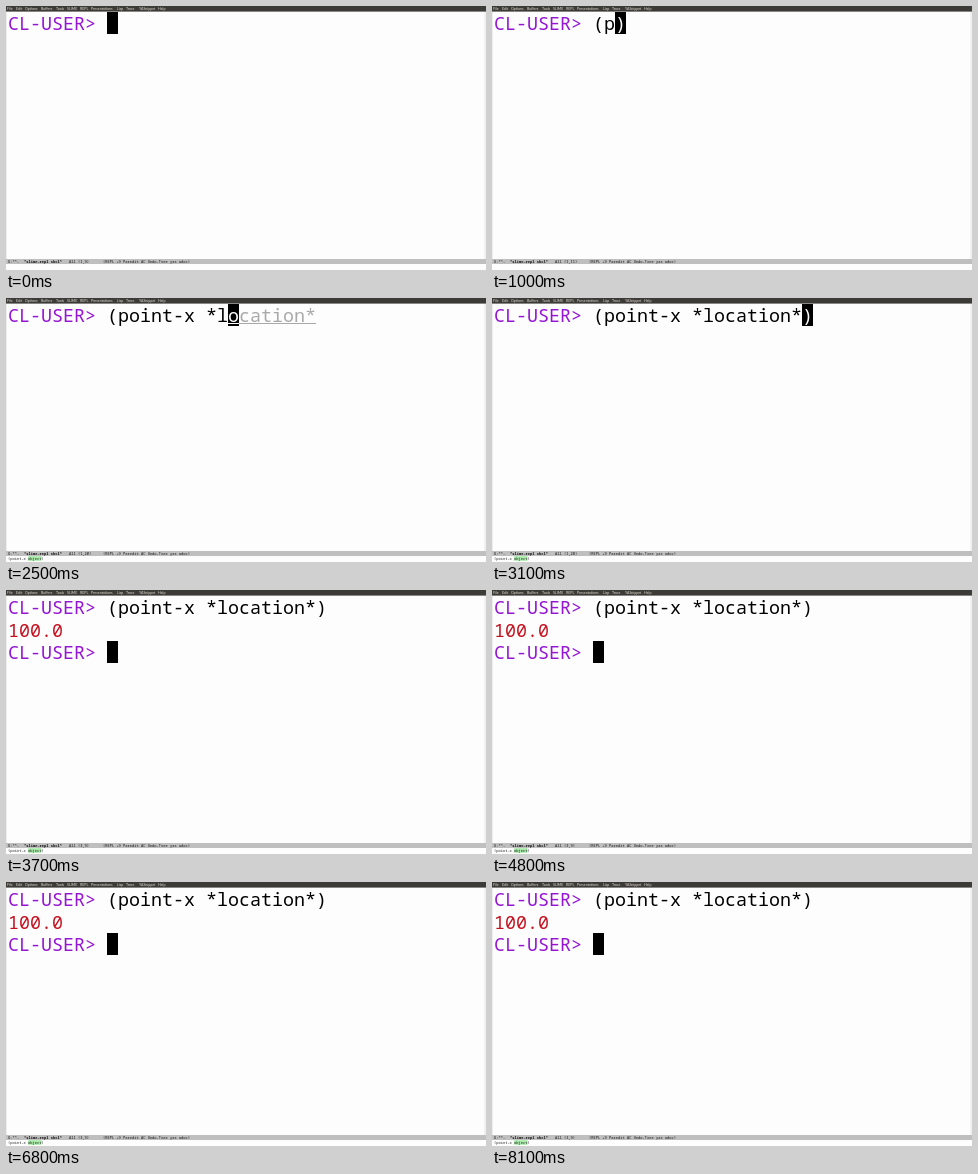
Recreate the animation shown at these times as an HTML page with a canvas. Size 480 by 264 pixels, loop 8.2 s.

```html
<!DOCTYPE html>
<html lang="en">
<head>
<meta charset="utf-8">
<title>REPL session</title>
<style>
html, body { margin: 0; width: 480px; height: 264px; overflow: hidden; background: #fdfdfd; }
canvas { display: block; }
</style>
</head>
<body>
<canvas id="stage" width="480" height="264"></canvas>
<script>
const ctx = document.getElementById('stage').getContext('2d');
const LOOP = 8200;
const MONO = '"Noto Sans Mono", "DejaVu Sans Mono", monospace';
const BIG = `18.33px ${MONO}`, SMALL = `3.72px ${MONO}`;
const CHAR = 11, LEFT = 2, TOP = 6, LINE = 22.5;
const PROMPT = 'CL-USER> ', PURPLE = '#9416d2';

const MENU = [['File', 1], ['Edit', 10], ['Options', 19], ['Buffers', 35], ['Tools', 50],
  ['SLIME', 61], ['REPL', 74], ['Presentations', 85], ['Lisp', 111], ['Trace', 120],
  ['YASnippet', 133], ['Help', 152]];

// Keystrokes and the time each one lands
const TYPED = '(point-x *l', REST = 'ocation*';
const KEYS = [800, 1000, 1100, 1200, 1300, 1400, 1700, 1800, 2000, 2200, 2400];
const HINT = 2500, COMPLETE = 2800, ENTER = 3200;

function box(x, y, w, h, color) {
  ctx.fillStyle = color;
  ctx.fillRect(x, y, w, h);
}

function text(s, x, y, color, font) {
  ctx.font = font;
  ctx.fillStyle = color;
  ctx.fillText(s, x, y);
}

function write(s, row, col, color) {
  text(s, LEFT + col * CHAR, TOP + row * LINE + 18, color, BIG);
}

function cursor(row, col, char = '') {
  box(LEFT + col * CHAR, TOP + row * LINE, CHAR, 22, '#000');
  write(char, row, col, '#fff');
}

function frame(row, col, help) {
  box(0, 0, 480, 264, '#fdfdfd');
  box(0, 6, 1, 247, '#eee');
  box(478, 6, 2, 247, '#f1f1f1');
  box(0, 0, 480, 5.6, '#3c3b37');
  for (const [label, x] of MENU) {
    text(label, x, 4.1, '#dfdbd2', '3.6px Lato, sans-serif');
  }
  box(0, 253, 480, 5, '#bfbfbf');
  text('U:**-', 2, 256.7, '#111', SMALL);
  text('*slime-repl sbcl*', 18, 256.7, '#111', 'bold ' + SMALL);
  text(`All (${row + 1},${col})`, 63, 256.7, '#111', SMALL);
  text('(REPL +9 Paredit AC Undo-Tree yas adoc)', 97, 256.7, '#111', SMALL);
  if (help) {
    box(22.1, 258.2, 13.4, 4.6, '#a8eba8');
    text('(point-x object)', 2, 261.5, '#222', SMALL);
  }
}

function draw(t) {
  const count = KEYS.filter(k => t >= k).length;
  const done = t >= ENTER;
  const input = TYPED.slice(0, count) + (t >= COMPLETE ? REST : '');
  const row = done ? 2 : 0;
  const col = PROMPT.length + (done ? 0 : input.length);

  frame(row, col, count >= 9);
  write(PROMPT, 0, 0, PURPLE);
  write(input, 0, PROMPT.length, '#000');

  if (done) {
    write(')', 0, PROMPT.length + input.length, '#000');
    write('100.0', 1, 0, '#c4101e');
    write(PROMPT, 2, 0, PURPLE);
    cursor(row, col);
  } else if (t >= HINT && t < COMPLETE) {
    const x = LEFT + col * CHAR;
    write(REST, 0, col, '#a9a9a9');
    cursor(0, col, REST[0]);
    box(x, 25, CHAR, 1, '#fff');
    box(x + CHAR, 25, (REST.length - 1) * CHAR, 1, '#a9a9a9');
  } else {
    cursor(0, col, count ? ')' : '');
  }
}

const start = performance.now();
function tick() {
  draw((performance.now() - start) % LOOP);
  requestAnimationFrame(tick);
}
tick();
</script>
</body>
</html>
```
